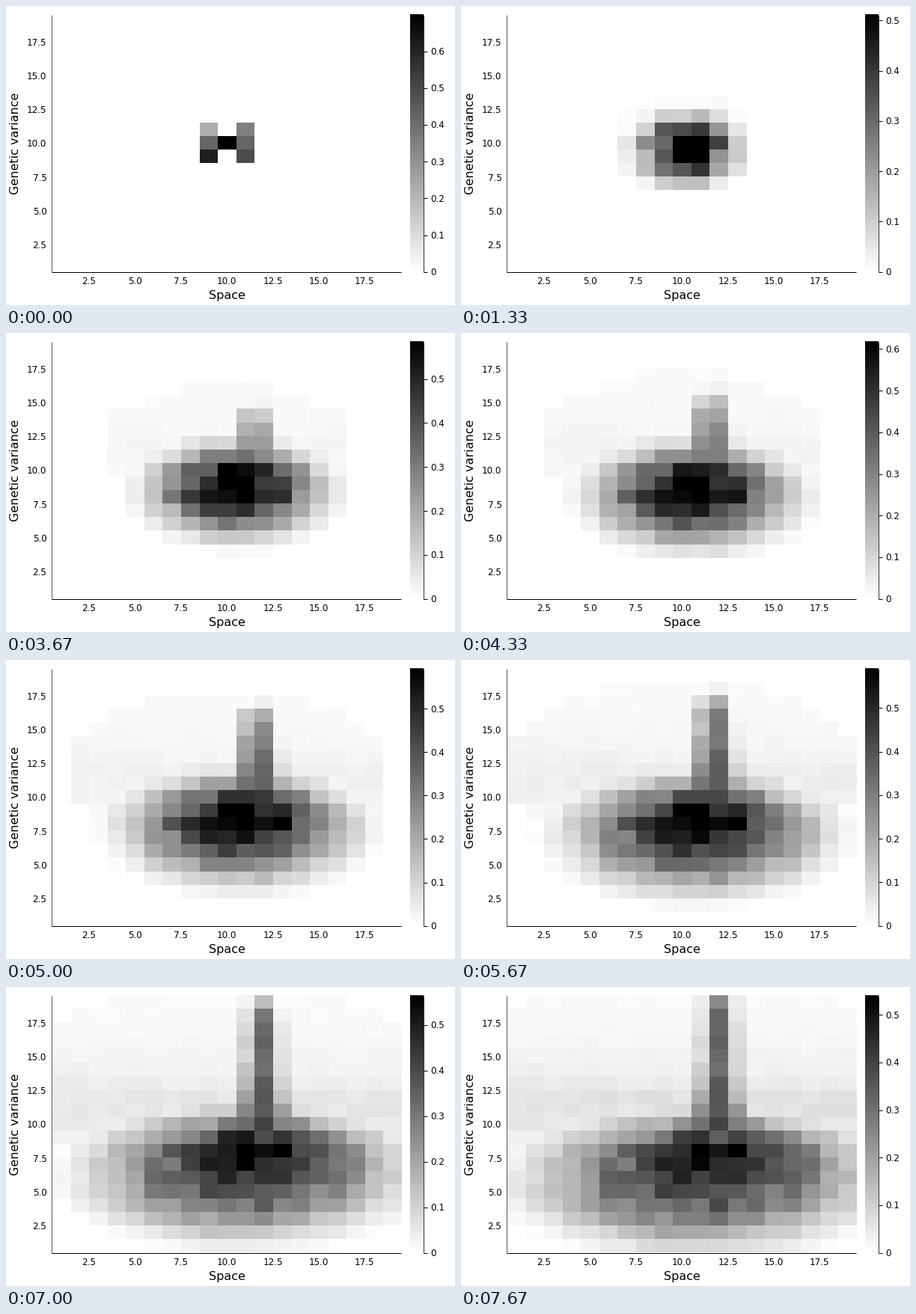
Write a matplotlib script that moves like this. It is 600 px wide and 400 px high and loops after 8 s.

```python
import numpy as np
import matplotlib.pyplot as plt
from matplotlib.animation import FuncAnimation

W, H, DPI = 600, 400, 100
LOOP, INTERVAL = 8000, 40
STEPS = 24
HOLD = LOOP / STEPS
N = 19
LEFT, RIGHT, TOP, BOTTOM = 61.6, 528.5, 11.8, 355.2
BAR_L, BAR_R = 540, 558
PX = 72 / DPI

plt.rcParams["font.family"] = "DejaVu Sans"

X, Y = np.meshgrid(np.arange(1, N + 1), np.arange(1, N + 1))
GRAIN = np.random.default_rng(7).uniform(-1, 1, (N, N))

# Highest density over time: (step, value)
PEAK_KEYS = np.array([(0, 0.698), (3, 0.495), (4, 0.5104), (5, 0.591), (7, 0.538),
                      (9, 0.618), (10, 0.557), (12, 0.611), (14, 0.622),
                      (15, 0.591), (19, 0.588), (23, 0.539)])


def sigmoid(v):
    return 1 / (1 + np.exp(-v))


def ellipse(cx, cy, rx, ry):
    return ((X - cx) / rx) ** 2 + ((Y - cy) / ry) ** 2


def founders():
    """Starting population: two side columns joined by a full centre cell."""
    dx, dy = X - 10, Y - 10
    inside = (abs(dx) <= 1) & (abs(dy) <= 1) & ((dx != 0) | (dy == 0))
    return inside * (0.6 - (0.19 - 0.09 * dx) * dy + 0.4 * (dx == 0))


def population(u):
    """Spreading body with a dark crest, a rising tower and a faint halo."""
    body_q = ellipse(10.3 + 0.6 * u, 10 - 4.2 * u ** 1.3,
                     1.6 + 8.2 * u ** 1.1, 1.5 + 3.8 * u ** 0.6)
    body = 0.72 * np.exp(-1.6 * body_q ** 1.4)
    crest = 0.38 * np.exp(-ellipse(9.7 + 2.8 * u * u, 9.6 - 1.5 * u, 2 + 2.5 * u, 2))

    foot = np.exp(-np.maximum(Y - 9, 0) / 2)
    tower = (0.58 + 0.25 * foot) * min(1, 1.5 * u)
    tower = tower * np.exp(-0.5 * ((X - 11 - u) / (0.6 + 1.4 * foot)) ** 2)
    tower *= sigmoid(2 * (Y - 8.5)) * sigmoid(2 * (9.5 + 10.5 * u - Y))

    halo = 0.015 + 0.1 * u ** 2 * np.exp(-np.maximum(Y - 12, 0) / 2.5)
    halo = halo * (ellipse(10, 12, 1 + 12 * u, 8.8 * u + 0.2) < 1) * sigmoid(2 * (Y - 9))

    cells = np.maximum(np.maximum(body + crest, tower) - 0.05, halo)
    return cells * (1 + (0.18 + 0.5 * np.exp(-6 * u)) * GRAIN)


def density(step):
    start = np.exp(-1.2 * step)
    grid = start * founders() + (1 - start) * population(step / (STEPS - 1))
    return np.clip(grid, 0, 1)


fig = plt.figure(figsize=(W / DPI, H / DPI), dpi=DPI, facecolor="white")
ax = fig.add_axes([0, 0, 1, 1])
ax.axis("off")


def line(xs, ys, color="black"):
    return ax.plot(xs, ys, color=color, lw=PX, solid_capstyle="butt", zorder=3)[0]


def label(x, y, text, size=12, **kw):
    kw = {"ha": "center", "va": "center_baseline", **kw}
    return ax.text(x, y, text, fontsize=size * PX, color="black", **kw)


def picture(data, extent):
    return ax.imshow(data, extent=extent, cmap="gray_r", vmin=0, vmax=1,
                     interpolation="nearest", aspect="auto")


heat = picture(density(0)[::-1], (LEFT, RIGHT, BOTTOM, TOP))
picture(np.linspace(1, 0, 256)[:, None], (BAR_L, BAR_R, BOTTOM, TOP))
ax.set_xlim(0, W)
ax.set_ylim(H, 0)

line([61, 61], [TOP, 356], "0.35")
line([61, 528], [356, 356])
line([558, 558], [TOP, 356], "0.2")

for v in np.arange(2.5, 18, 2.5):
    label(LEFT + (v - 0.5) * (RIGHT - LEFT) / N, 367, f"{v:.1f}")
    label(54.5, BOTTOM - (v - 0.5) * (BOTTOM - TOP) / N, f"{v:.1f}", ha="right")
label((LEFT + RIGHT) / 2, 392, "Space", 16, va="baseline")
label(12.2, (TOP + BOTTOM) / 2, "Genetic variance", 16, rotation=90, va="center")

ticks = [(line([558, 563], [0, 0]), label(567, 0, "", ha="left")) for _ in range(11)]


def update(frame):
    # The small lead keeps each change on or just before its nominal time.
    step = int((frame * INTERVAL + 28) / HOLD) % STEPS
    heat.set_data(density(step)[::-1])
    peak = np.interp(step, *PEAK_KEYS.T)
    unit, digits = (0.1, 1) if peak > 0.5 else (0.05, 2)
    for k, (mark, text) in enumerate(ticks):
        value = k * unit
        y = BOTTOM - value / peak * (BOTTOM - TOP)
        mark.set_ydata([y + 0.5, y + 0.5])
        text.set_y(y)
        text.set_text(f"{value:.{digits}f}" if k else "0")
        for part in (mark, text):
            part.set_visible(value <= peak)
    return []


anim = FuncAnimation(fig, update, frames=LOOP // INTERVAL, interval=INTERVAL,
                     repeat=True, repeat_delay=0, blit=False)
plt.show()
```
